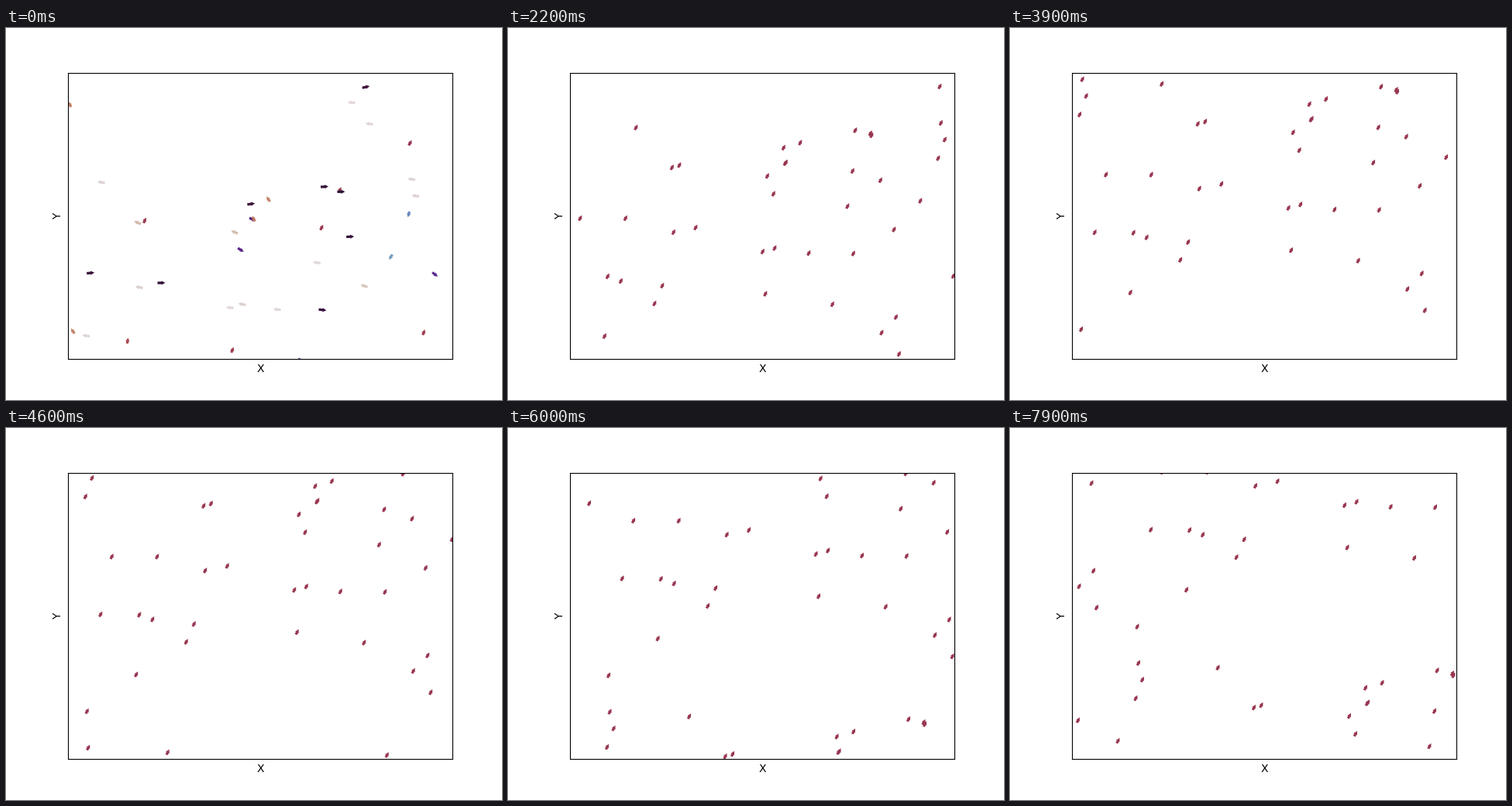
These frames come from a looping animation (640 px wide and 480 px high, 8000 ms). A matplotlib script:

```python
import numpy as np
import matplotlib.pyplot as plt
from matplotlib.animation import FuncAnimation

FRAMES, STEP_MS = 80, 100
BOX, SPEED = 3.1, 0.03
ALIGNED = np.radians(67.85)
SETTLED = 11  # step at which the flock stands at FLOCK
rng = np.random.default_rng(4)

# Key points of the scattered flock, in stage pixels
FLOCK = np.array([
    (104.5, 63.5), (462, 59), (484.5, 86.5), (537, 111), (145, 164),
    (538.5, 158), (543.5, 179.5), (535, 203.5), (428, 167.5), (447.5, 171.5),
    (449, 174), (335.5, 190), (357, 183.5), (191.5, 215.5), (201, 212.5),
    (337.5, 210), (338.5, 209), (314.5, 226.5), (322.5, 249.5), (424.5, 220),
    (460.5, 232), (418, 265.5), (512, 258.5), (131.5, 281), (193.5, 299),
    (222, 293), (569, 281), (478, 295.5), (308.5, 324), (324, 319.5),
    (368, 326), (425.5, 326.5), (108.5, 356), (125.5, 362), (179, 368),
    (169, 391), (312, 378.5), (398.5, 392), (480.5, 408.5), (554.5, 355.5),
])

fig, ax = plt.subplots(figsize=(6.4, 4.8), dpi=100)
ax.set(xlim=(0, BOX), ylim=(0, BOX), xticks=[], yticks=[],
       xlabel="X", ylabel="Y")

settled = (FLOCK + 0.5 - (80, 427.2)) / (496, -369.6) * BOX

# Random starts, then each side of the box turns quickly to the shared heading
start = np.radians(rng.choice([-110, -40, 0, 8, 75, 108, 148, 168], len(FLOCK))
                   + rng.uniform(-10, 10, len(FLOCK)))
swerve = -np.radians(44) * np.cos(np.pi * settled[:, 0] / BOX)
headings = np.array([start] + [ALIGNED + swerve * 0.12 ** n
                               for n in range(FRAMES - 1)])

strides = SPEED * np.stack([np.cos(headings), np.sin(headings)], axis=-1)
travel = strides.cumsum(axis=0)
paths = settled + travel - travel[SETTLED]
# A bird wraps around only on the step after it leaves the box
paths = (paths - strides) % BOX + strides

arrows = ax.quiver(*paths[0].T, *strides[0].T, headings[0],
                   cmap="twilight", clim=(-np.pi, np.pi), pivot="mid",
                   angles="xy", scale_units="xy", scale=16 * SPEED,
                   width=0.0065, headwidth=1.6, headlength=1.5,
                   headaxislength=1.5)


def update(i):
    arrows.set_offsets(paths[i])
    arrows.set_UVC(*strides[i].T, headings[i])
    return arrows,


anim = FuncAnimation(fig, update, frames=FRAMES, interval=STEP_MS,
                     repeat=True, repeat_delay=0)
plt.show()
```
